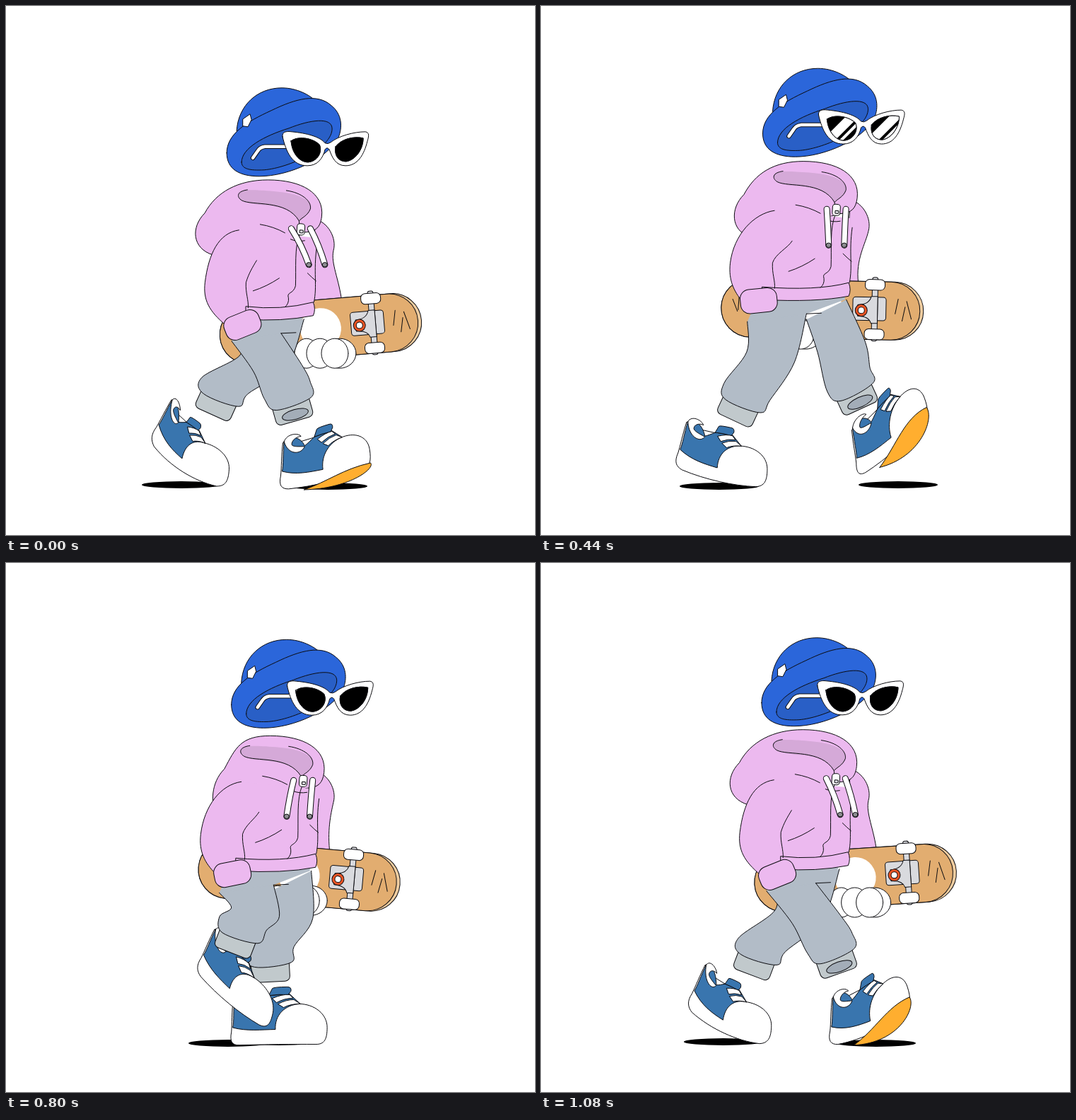
An HTML page with a canvas that plays this animation: 748 by 748 pixels, repeating every 1120 ms.

```html
<!DOCTYPE html>
<html lang="en">
<head>
<meta charset="utf-8">
<title>Walk cycle</title>
<style>
html, body { margin: 0; width: 100%; height: 100%; overflow: hidden; background: #fff; }
canvas { display: block; }
</style>
</head>
<body>
<canvas id="stage" width="748" height="748"></canvas>
<script>
const c = document.getElementById('stage').getContext('2d');
const LOOP = 1120, HALF = LOOP / 2, STEP = 40, FAR_SHIFT = 42;
const INK = '#0c0c10', WHITE = '#fff', PINK = '#ecb9ef', PINK_DARK = '#d5a9d8', PANTS = '#b2bcc7',
  CUFF = '#c1c9cc', DENIM = '#3975ae', HAT = '#2b66da', HAT_IN = '#295fc6', WOOD = '#e2ad70',
  METAL = '#d9dade', RED = '#ea5424', SOLE = '#ffae2f';
const { sin, cos, min, max, PI } = Math;
const rad = deg => deg * PI / 180;
const mix = (a, b, u) => a + (b - a) * u;

// One foot's cycle, shared by both feet: time, x, y, heel angle, toe angle
const GAIT = [
  [0, 455, 676, 0, -24],
  [80, 421, 681, 0, 0],
  [280, 325, 681, 0, 0],
  [440, 252, 676, 30, 0],
  [560, 206, 664, 65, 8],
  [640, 232, 638, 75, 35],
  [800, 314, 626, 55, 28],
  [920, 404, 667, 0, 0],
  [1000, 463, 628, -28, -50],
  [1080, 474, 667, 0, -45]
];

// Periodic cubic interpolation through the gait
function footAt(t, shift) {
  t %= LOOP;
  const n = GAIT.length;
  let i = n - 1;
  while (GAIT[i][0] > t) i--;
  const [p, a, b, q] = [-1, 0, 1, 2].map(k => {
    const j = i + k, [time, ...rest] = GAIT[(j + n) % n];
    return [time + LOOP * Math.floor(j / n), ...rest];
  });
  const h = b[0] - a[0], u = (t - a[0]) / h;
  const [x, y, heel, toe] = [1, 2, 3, 4].map(k => {
    const d = b[k] - a[k];
    const m = (b[k] - p[k]) / (b[0] - p[0]) * h, e = (q[k] - a[k]) / (q[0] - a[0]) * h;
    return a[k] + u * (m + u * (3 * d - 2 * m - e + u * (m + e - 2 * d)));
  });
  return { x: x + shift, y, heel, toe, cuffX: x + shift + (310 - x) * .34 + heel * .2,
    cuffY: y - 104 + (680 - y) * .3 - min(0, heel) * .6 };
}

function draw(d, fill, line = 1) {
  const p = typeof d === 'string' ? new Path2D(d) : d;
  if (fill) { c.fillStyle = fill; c.fill(p); }
  if (line) { c.strokeStyle = INK; c.lineWidth = line; c.stroke(p); }
}
function oval(x, y, rx, ry, fill, line = 1) {
  const p = new Path2D();
  p.ellipse(x, y, rx, ry, 0, 0, 7);
  draw(p, fill, line);
}
function box(x, y, w, h, r, fill) {
  const p = new Path2D();
  p.roundRect(x, y, w, h, r);
  draw(p, fill);
}
// Outlined thick line
function cord(d, width) {
  const p = new Path2D(d);
  for (const [color, w] of [[INK, width + 2], [WHITE, width]]) {
    c.strokeStyle = color; c.lineWidth = w; c.stroke(p);
  }
}
function at(x, y, deg, paint) {
  c.save();
  c.translate(x, y);
  c.rotate(rad(deg));
  paint();
  c.restore();
}
// Smooth open curve through points
function smooth(pts) {
  const pt = i => pts[max(0, min(pts.length - 1, i))];
  return pts.slice(1).reduce((d, e, i) => {
    const a = pt(i - 1), b = pt(i), f = pt(i + 2);
    return d + `C${b.map((s, k) => s + (e[k] - a[k]) / 6)} ${e.map((s, k) => s - (f[k] - b[k]) / 6)} ${e}`;
  }, `M${pts[0]}`);
}
// Bends a path along a sole that turns from the heel angle to the toe angle
function bend(d, heel, toe) {
  const angle = x => rad(mix(heel, toe, max(0, min(1, (x + 65) / 110))));
  return d.replace(/(-?[\d.]+),(-?[\d.]+)/g, (_, x, y) => {
    const a = angle(x / 2), lean = .4 * angle(+x);
    return [x * cos(a) - y * sin(lean), x * sin(a) + y * cos(lean)].map(v => v.toFixed(2)).join();
  });
}

function drawShoe({ x, y, heel, toe }) {
  const part = (d, fill) => draw(bend(d, heel, toe), fill);
  at(x, y, 0, () => {
    part('M-64,-66C-66,-50 -66,-30 -67,-20C-70,-6 -66,-1 -56,-1C-20,-1 20,-1 52,-1C64,-1 68,-8 68,-25C68,-44 50,-58 28,-58L0,-70L-40,-66Z', WHITE);
    part('M-62,-68C-64,-50 -63,-35 -65,-26C-45,-20 -25,-22 -5,-22C-6,-42 8,-57 30,-58L15,-72L-14,-70C-20,-66 -26,-62 -30,-60C-36,-74 -55,-78 -62,-68Z', DENIM);
    part('M-14,-70L-9,-80Q-7,-82 12,-82Q18,-82 17,-76L13,-71Q0,-72 -14,-70Z', DENIM);
    part('M-9,-66Q5,-72 15,-71L20,-66Q8,-66 -3,-60Z', WHITE);
    part('M-1,-58Q10,-64 21,-64L30,-58Q16,-58 7,-53Z', WHITE);
    part('M-62,-68C-58,-79 -40,-80 -35,-74C-44,-74 -51,-68 -50,-63C-48,-60 -40,-60 -30,-59C-36,-48 -56,-48 -62,-68Z', WHITE);
    if (toe < -5) {
      const k = -toe / 40;
      part(`M-34,${3 * k}C0,${-6 * k} 25,${-24 * k} 66,${-10 * k}C72,${8 * k} 30,${26 * k} -34,${3 * k}Z`, SOLE);
    }
  });
}

// Trouser leg from the hip line down to a gathered cuff
function drawLeg({ cuffX, cuffY, heel }, hipL, hipR) {
  const midX = (hipL[0] + hipR[0]) / 2, midY = (hipL[1] + hipR[1]) / 2;
  const tilt = .75 * Math.atan2(365 - cuffX, cuffY - midY);
  const around = (x, y, a, u, v) => [x + u * cos(a) - v * sin(a), y + u * sin(a) + v * cos(a)];
  const kneeX = mix(midX, cuffX, .42) + 8 + heel * .2, kneeY = mix(midY, cuffY, .42);
  const knee = u => around(kneeX, kneeY, tilt / 2, u, 0);
  const hem = (u, v) => around(cuffX, cuffY, tilt, u, v);
  at(cuffX, cuffY, tilt * 180 / PI, () => {
    box(-27, -20, 54, 34, 7, CUFF);
    if (tilt < -.2) oval(2, 5, 19, 7, '#a3adb8');
  });
  draw(smooth([hipL, knee(-34), hem(-34, -28), hem(-22, -8), hem(30, -12), hem(35, -34), knee(35), hipR]), PANTS);
}

function drawBoard(x, y, deg, hand) {
  at(x, y, deg, () => {
    box(-143, -41, 286, 82, 41, '#f0cda0');
    box(-143, -41, 281, 82, 41, WOOD);
    oval(0, 0, 29, 29, WHITE, 0);
    draw('M107,-17L103,4M117,-6L113,14M119,-14L126,11M-127,-12L-120,5M-118,-17L-119,3', null);
    box(43, -19, 47, 33, 4, METAL);
    box(70, -47, 8, 90, 3, METAL);
    draw('M50,-8Q66,-8 69,-20L78,-20L78,18L69,18Q66,8 50,8Z', METAL);
    box(60, -44, 28, 15, 6, WHITE);
    box(60, 26, 28, 15, 6, WHITE);
    oval(55, 0, 8.5, 8.5, RED);
    oval(55, 0, 4.5, 4.5, WHITE);
  });
  for (const [dx, r] of [[22, 23], [-25, 17], [-6, 19], [15, 19]])
    oval(x + hand + dx, y + 35, r, 21, WHITE);
}

function drawHoodie(swing, sway, wrist, wristY, beats) {
  const hood = 280.5 + 3.7 * sway, sleeve = 275 + 8 * swing, fold = 334 + 7 * swing;
  const sleeveEdge = `M331,201C302,205 ${sleeve + 5},235 ${sleeve},275C${sleeve - 3},300 ${sleeve + 6},316 ${wrist - 24},${wristY}`;
  at(0, sway * .9, 0, () => {
    draw(`M294,239C${hood - 4},230 ${hood - 6},200 ${hood + 14},180C${hood + 30},150 330,133 372,133C420,133 452,152 448,185C446,200 440,206 424,207L340,230Z`, PINK);
    draw('M330,155C328,147 340,146 380,149C420,152 436,164 432,174C428,184 420,186 416,191C405,172 385,170 360,168C340,166 331,162 330,155Z', PINK_DARK, 0);
    draw('M343,147C328,149 327,157 335,162C350,170 398,160 416,191C420,186 428,184 432,174C434,163 420,151 398,148M416,191L417,205', null);
  });
  draw(sleeveEdge + 'L345,327L436,322L440,270L440,212Z', PINK, 0);
  draw(sleeveEdge, null);
  draw(`M${wrist + 5},309Q390,315 436,303Q440,313 436,322Q390,331 ${wrist + 5},327Z`, PINK);
  draw(`M356,244C350,254 ${fold + 4},262 ${fold},275C${fold - 1},290 ${fold + 4},300 ${fold + 3},311`, null);
  draw('M351,287Q370,281 388,269M361,193Q380,196 396,205M404,214Q413,218 424,216M428,262Q434,268 440,273M441,225C436,260 442,280 437,303', null);
  draw('M417,207C409,225 412,255 411,280C408,292 398,288 401,297Q402,305 396,310', null);
  at(wrist, wristY, -13 - 9 * swing, () => box(-26, -17, 52, 34, 13, PINK));
  at(418, 200, 4, () => {
    box(-5, -8, 11, 16, 4, WHITE);
    box(-1, 1, 5, 4, 1, METAL);
  });
  beats.forEach((dx, i) => {
    const x = 405 + 27 * i;
    cord(`M${x},199Q${x + dx * .6},222 ${x + dx},250`, 7);
    oval(x + dx, 250, 3.6, 3.2, '#8e8e92');
  });
}

function drawHat() {
  draw('M326,176C328,140 355,115 390,115C412,115 430,126 436,132L400,170Z', HAT);
  draw('M312,207C312,180 340,163 375,147C410,130 440,122 460,140C475,152 476,170 470,185C455,215 400,240 358,240C330,240 312,230 312,207Z', HAT);
  draw('M333,220C333,200 365,183 400,172C430,160 460,156 461,172C462,200 400,228 365,231C345,232 333,230 333,220Z', HAT_IN);
  draw('M335,159L345,152L347,160L342,170L335,169Z', WHITE);
}

const LENSES = [
  'M403,190C412,183 432,185 443,195C448,206 440,219 427,220C414,220 404,206 403,190Z',
  'M466,198C474,187 492,183 505,186C505,202 494,217 481,219C468,219 464,208 466,198Z'
];
function drawGlasses(t) {
  cord('M396,198L366,198Q359,199 356,204L349,214', 4.5);
  draw('M391,184C390,177 396,176 404,177C425,179 444,184 451,193Q455,195 459,192C470,183 492,177 508,177C514,178 513,183 511,190C506,210 497,225 480,225C466,225 461,213 457,202Q454,198 451,202C448,215 440,225 426,225C405,225 396,206 391,184Z', WHITE);
  const glint = 16 - (t - 280) * .1;
  LENSES.forEach((d, i) => {
    draw(d, '#000');
    c.save();
    c.clip(new Path2D(d));
    at(424 + 61 * i, 203, 45, () => {
      c.fillStyle = WHITE;
      c.fillRect(glint - 8, -40, 13, 80);
      c.fillRect(glint + 9, -40, 4, 80);
    });
    c.restore();
    draw(d, null);
  });
}

function render(t) {
  // Bounce repeats every step, swing every two steps
  const bounce = lag => cos(2 * PI * (t - lag) / HALF);
  const stride = lag => cos(2 * PI * (t - lag) / LOOP);
  const bodyY = 107 + 23 * bounce(105), sway = 3.4 * bounce(250), swing = stride(-10);
  const wrist = 321 + 15 * swing, wristY = 331.5 + 3.7 * swing, farWrist = 460.5 + 14.5 * swing;
  const near = footAt(t, 0), far = footAt(t + HALF, FAR_SHIFT);
  const crotch = [381 + 8 * stride(20), bodyY + 347];
  const hipL = [wrist - 17, bodyY + 358], hipR = [428 - 7 * stride(60), bodyY + 327];
  const farHip = [crotch[0] - max(0, crotch[0] - far.cuffX) * .65, crotch[1] + 8];

  c.fillStyle = WHITE;
  c.fillRect(0, 0, 748, 748);
  c.lineCap = c.lineJoin = 'round';

  oval(far.x, 677, 56, 5, '#000', 0);
  oval(near.x, 679, 56, 5, '#000', 0);

  at(0, bodyY, 0, () =>
    draw(`M438,186C455,190 468,212 463,230C459,248 ${farWrist - 4},270 ${farWrist},303L430,306Z`, PINK));
  drawBoard(419 + 26 * swing, bodyY + 339 + 5 * stride(230), -6.3 * stride(125), 5 - 62 * max(0, -swing));

  drawShoe(far);
  drawLeg(far, farHip, hipR);
  const pelvis = new Path2D(`M${wrist},${bodyY + 320}L${hipR[0] - 2},${bodyY + 320}L${hipR[0] - 2},${hipR[1]}L${crotch}L${hipL}Z`);
  draw(pelvis, PANTS, 0);
  drawShoe(near);
  drawLeg(near, hipL, crotch);
  // Hide the joint between the near leg and the pelvis
  c.strokeStyle = PANTS;
  c.lineWidth = 2;
  c.stroke(new Path2D(`M${hipL[0] + 3},${hipL[1]}L${crotch[0] - 3},${crotch[1]}`));
  draw(`M${crotch}l21,-1`, null);

  at(sway * .5, bodyY, 0, () =>
    drawHoodie(swing, sway, wrist, wristY, [5 + 21 * bounce(30), 5 + 19 * bounce(55)]));
  at(sway + 3.3, bodyY - 115, 0, () => {
    drawHat();
    c.translate(0, 2.6 * bounce(60) - 2);
    drawGlasses(t);
  });
}

const start = performance.now();
function frame() {
  render(Math.floor((performance.now() - start) % LOOP / STEP) * STEP);
  requestAnimationFrame(frame);
}
frame();
</script>
</body>
</html>
```
